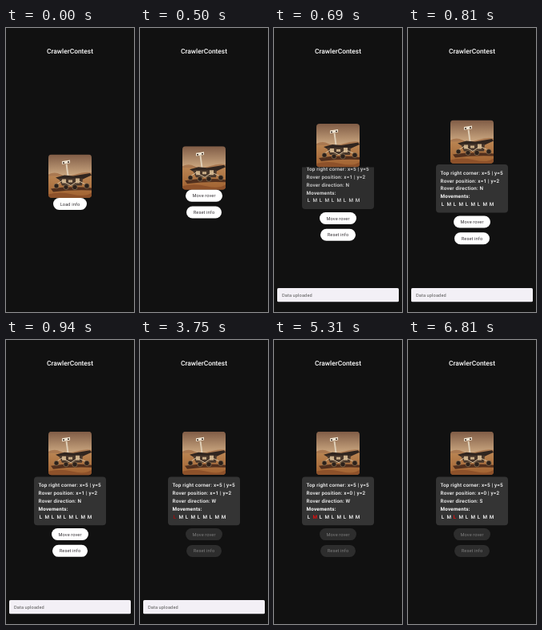
An HTML page that plays this animation: 160x356 px, repeating every 8000 ms.

```html
<!DOCTYPE html>
<html lang="en">
<head>
<meta charset="utf-8">
<title>CrawlerContest</title>
<style>
  html, body { margin: 0; width: 100%; height: 100%; overflow: hidden; background: #111; }
  svg { display: block; width: 100%; height: 100%; }
  text { font-family: Roboto, sans-serif; fill: #fff; text-rendering: geometricPrecision; }
  .title { font-size: 8.4px; font-weight: 500; text-anchor: middle; }
  .card text { font-size: 6.3px; font-weight: 500; letter-spacing: .19px; }
  .card .bold { font-weight: 700; }
  .button rect { fill: #fff; }
  .button text { font-size: 5.7px; letter-spacing: .1px; text-anchor: middle; fill: #3c383c; }
  .disabled .button rect { fill: #2d2d2d; }
  .disabled .button text { fill: #7c7c7c; }
  #snackbar rect { fill: #f3f0f6; }
  #snackbar text { font-size: 5.6px; letter-spacing: .13px; fill: #555; }
</style>
</head>
<body>
<svg viewBox="0 0 160 356">
  <defs>
    <linearGradient id="sky" x2="0" y2="1">
      <stop offset="0" stop-color="#805c46"/>
      <stop offset="1" stop-color="#cfab83"/>
    </linearGradient>
    <linearGradient id="ground" x2="0" y2="1">
      <stop offset="0" stop-color="#b98452"/>
      <stop offset="1" stop-color="#a0602f"/>
    </linearGradient>
    <clipPath id="photoClip"><rect width="54" height="54.3" rx="4"/></clipPath>
    <clipPath id="cardClip"><rect id="cardWindow" x="30" width="100"/></clipPath>
  </defs>
  <rect width="160" height="356" fill="#111"/>
  <text class="title" x="80" y="32.3">CrawlerContest</text>

  <g id="photo">
    <g clip-path="url(#photoClip)">
      <rect width="54" height="28" fill="url(#sky)"/>
      <path d="M0 25Q8 21 15 25T34 25T54 23V32H0Z" fill="#a97850"/>
      <rect y="27" width="54" height="28" fill="url(#ground)"/>
      <path d="M3 43Q28 39 54 42V45Q28 44 6 47Z" fill="#512f1d"/>
      <path d="M0 50Q14 46 30 50T54 48V55H0Z" fill="#8d512a"/>
      <path d="M22.5 12L24.5 27" stroke="#e0d0b8" stroke-width="1.9"/>
      <path d="M17 8.5L27 7V10.8L17 12.3Z" fill="#eee4d2"/>
      <path d="M18 10.5H20M24 9.5H26" stroke="#382a22" stroke-width="1.5"/>
      <path d="M9 29L20 26L31 27L52 23.5L54 26L43 31L16 33Z" fill="#30251f"/>
      <path d="M13 30H43L42 39H17Z" fill="#49382c"/>
      <path d="M17 31H22V36H17ZM25 32H30V35H25ZM34 30H39V36H34Z" fill="#c9ad87"/>
      <path d="M8 39L17 33L28 39L37 33L48 38" fill="none" stroke="#d8bf9c"/>
      <g fill="#2c211b" stroke="#a0835f" stroke-width=".6">
        <circle cx="10" cy="39.5" r="3"/><circle cx="22" cy="41" r="3"/>
        <circle cx="33" cy="41" r="3.2"/><circle cx="48" cy="39.5" r="3.2"/>
      </g>
    </g>
  </g>

  <g id="cardClipper" clip-path="url(#cardClip)">
    <g id="card" class="card">
      <rect x="35" y="2.3" width="90" height="60.6" rx="4" fill="#343434"/>
      <text x="40.6" y="15.1">Top right corner: x=5 | y=5</text>
      <text x="40.6" y="24.9" id="position"></text>
      <text x="40.6" y="34.7" id="direction"></text>
      <text x="40.6" y="44.5" class="bold">Movements:</text>
      <g id="moves"></g>
    </g>
  </g>

  <g id="loadButton" class="button">
    <rect x="59" y="213" width="42" height="15" rx="7.5"/>
    <text x="80" y="222.6">Load info</text>
  </g>
  <g id="actions">
    <g class="button">
      <rect x="57" width="46" height="15" rx="7.5"/>
      <text x="80" y="9.6">Move rover</text>
    </g>
    <g class="button" transform="translate(0 20.8)">
      <rect x="58" width="44" height="15" rx="7.5"/>
      <text x="80" y="9.6">Reset info</text>
    </g>
  </g>

  <g id="snackbar">
    <rect x="4" y="326" width="152" height="17.3" rx="1.6"/>
    <text x="10" y="336.7">Data uploaded</text>
  </g>
</svg>
<script>
const LOOP = 8000, STEP = 62.5;
const LOADED = 500, CARD_START = 520, SNACK_OUT = 4540;
const MOVE_TIMES = [3750, 5312.5, 6812.5];
const CARD_SPACE = 66.8, PHOTO_HEIGHT = 54.5;

const el = id => document.getElementById(id);
const clamp = v => Math.min(1, Math.max(0, v));
const shift = (id, x, y) => el(id).setAttribute('transform', `translate(${x} ${y})`);
const show = (id, visible) => el(id).setAttribute('visibility', visible ? 'visible' : 'hidden');

// Critically damped spring from 0 to 1
function spring(ms) {
  const x = Math.max(0, ms) * 0.02;
  return 1 - (1 + x) * Math.exp(-x);
}

let letterX = 41.8;
const letters = [...'LMLMLMLMM'].map(char => {
  const text = document.createElementNS('http://www.w3.org/2000/svg', 'text');
  text.textContent = char;
  text.setAttribute('x', letterX);
  text.setAttribute('y', 54.3);
  letterX += char === 'L' ? 6.6 : 8.4;
  return el('moves').appendChild(text);
});

function render(t) {
  const loaded = t >= LOADED;
  const open = spring(t - CARD_START);
  const space = CARD_SPACE * open;
  const photoY = loaded ? 148.2 - space / 2 : 158.5;
  const photoBottom = photoY + PHOTO_HEIGHT;

  shift('photo', 53, photoY);
  shift('card', 0, photoBottom + space - CARD_SPACE);
  el('cardWindow').setAttribute('y', photoBottom);
  el('cardWindow').setAttribute('height', space);
  el('card').setAttribute('opacity', open);
  shift('actions', 0, photoBottom + space);
  show('loadButton', !loaded);
  show('actions', loaded);
  show('cardClipper', open > 0);

  const step = MOVE_TIMES.filter(time => t >= time).length;
  el('actions').classList.toggle('disabled', step > 0);
  el('position').textContent = `Rover position: x=${step > 1 ? 0 : 1} | y=2`;
  el('direction').textContent = 'Rover direction: ' + 'NWWS'[step];
  const red = step === 1 ? 180 + 75 * clamp((t - MOVE_TIMES[0]) / 750) : 255;
  letters.forEach((letter, i) => {
    letter.style.fill = i === step - 1 ? `rgb(${red}, 10, 10)` : '#fff';
  });

  const snack = Math.min(clamp((t - CARD_START) / 150), 1 - clamp((t - SNACK_OUT) / 100));
  const scale = 0.8 + 0.2 * snack * snack * (3 - 2 * snack);
  el('snackbar').setAttribute('opacity', snack);
  el('snackbar').setAttribute('transform',
    `translate(80 334.7) scale(${scale}) translate(-80 -334.7)`);
}

const start = performance.now();
function tick() {
  const t = Math.max(0, performance.now() - start) % LOOP;
  render(Math.floor((t + 2.5) / STEP) * STEP);
  requestAnimationFrame(tick);
}
tick();
</script>
</body>
</html>
```
